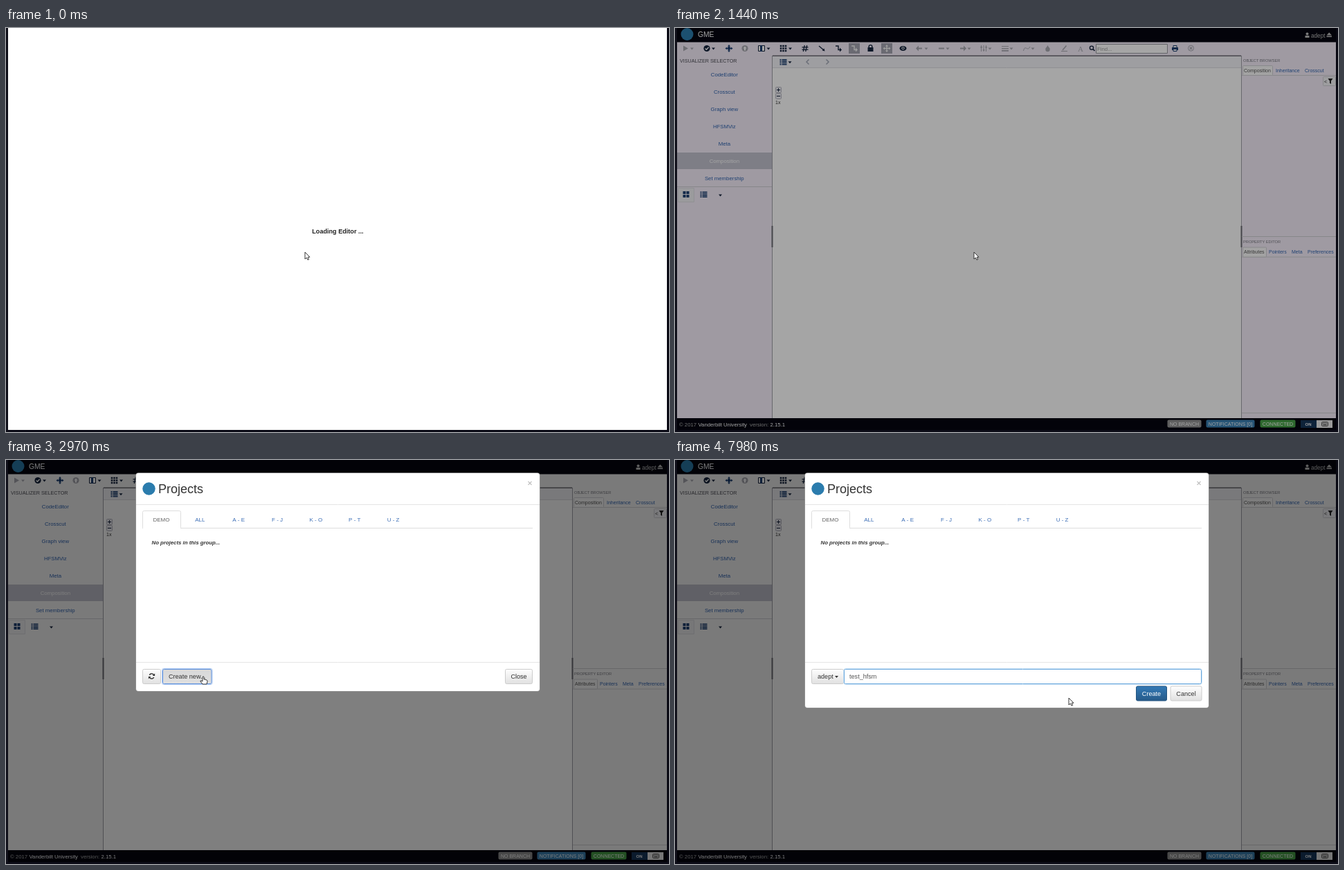
An HTML page with a canvas that plays this animation: 958x584 px, repeating every 8 s.

```html
<!DOCTYPE html>
<html lang="en">
<head>
<meta charset="utf-8">
<title>Editor</title>
<style>
html, body { margin: 0; width: 100%; height: 100%; overflow: hidden; background: #fff; }
canvas { display: block; }
</style>
</head>
<body>
<canvas id="stage" width="958" height="584"></canvas>
<script>
const ctx = document.getElementById('stage').getContext('2d');
const LOOP = 8000;
const NAVY = '#1c3f70', LINK = '#2f62ae', GREY = '#a9a9b2', DARK = '#14233c', LOGO = '#2b7cad';
const USER = 'adept';
const KEYS = [5460, 5520, 5600, 5690, 6130, 6480, 6780, 6930, 7200];
const NAME = 'test_hfsm';
const FOCUS = 2960, FORM = 3090;

const clamp = v => Math.max(0, Math.min(1, v));
const span = (t, a, b) => clamp((t - a) / (b - a));
const smooth = p => p * p * (3 - 2 * p);

// CSS ease-out: cubic-bezier(0, 0, .58, 1)
function easeOut(x) {
  let lo = 0, hi = 1;
  for (let i = 0; i < 20; i++) {
    const s = (lo + hi) / 2;
    if (1.74 * (1 - s) * s * s + s ** 3 < x) lo = s; else hi = s;
  }
  return 3 * (1 - lo) * lo * lo + lo ** 3;
}

function rect(x, y, w, h, color) {
  ctx.fillStyle = color;
  ctx.fillRect(x, y, w, h);
}

function box(x, y, w, h, fill, stroke, r = 0) {
  ctx.beginPath();
  ctx.roundRect(x + .5, y + .5, w - 1, h - 1, r);
  if (fill) { ctx.fillStyle = fill; ctx.fill(); }
  if (stroke) { ctx.strokeStyle = stroke; ctx.lineWidth = 1; ctx.stroke(); }
}

function text(s, x, y, size, color, align = 'left', style = '') {
  ctx.font = `${style} ${size}px "Liberation Sans", Arial, sans-serif`;
  ctx.textAlign = align;
  ctx.fillStyle = color;
  ctx.fillText(s, x, y);
}

function line(color, width, ...pts) {
  ctx.beginPath();
  for (let i = 0; i < pts.length; i += 2) ctx.lineTo(pts[i], pts[i + 1]);
  ctx.strokeStyle = color;
  ctx.lineWidth = width;
  ctx.stroke();
}

function poly(color, ...pts) {
  ctx.beginPath();
  for (let i = 0; i < pts.length; i += 2) ctx.lineTo(pts[i], pts[i + 1]);
  ctx.closePath();
  ctx.fillStyle = color;
  ctx.fill();
}

function disc(x, y, r, color) {
  ctx.beginPath();
  ctx.arc(x, y, r, 0, 7);
  ctx.fillStyle = color;
  ctx.fill();
}

function ring(x, y, r, color, width = 1) {
  ctx.beginPath();
  ctx.arc(x, y, r, 0, 7);
  ctx.strokeStyle = color;
  ctx.lineWidth = width;
  ctx.stroke();
}

const caret = (x, y, c) => poly(c, x - 2.5, y - 1, x + 2.5, y - 1, x, y + 2);

function grid(x, y, n, cell, gap, color) {
  const half = (n * cell + (n - 1) * gap) / 2;
  for (let i = 0; i < n * n; i++)
    rect(x - half + (i % n) * (cell + gap), y - half + Math.floor(i / n) * (cell + gap), cell, cell, color);
}

function listIcon(x, y, c) {
  for (let i = 0; i < 4; i++) {
    rect(x - 5, y - 4 + i * 2.3, 2, 1.6, c);
    rect(x - 2, y - 4 + i * 2.3, 7, 1.6, c);
  }
}

function arrowLine(x, y, dir, c) {
  line(c, 2, x - 4, y, x + 4, y);
  if (dir) poly(c, x + 5 * dir, y, x + dir, y - 4, x + dir, y + 4);
}

function elbow(x, y, c) {
  line(c, 1.4, x - 4, y - 3.5, x, y - 3.5, x, y + 2, x + 3, y + 2);
  poly(c, x + 5, y + 2, x + 2, y - 1, x + 2, y + 5);
}

function cross(x, y, c) {
  line(c, 1.3, x - 4, y, x + 4, y);
  line(c, 1.3, x, y - 4, x, y + 4);
  for (const [a, b] of [[1, 0], [-1, 0], [0, 1], [0, -1]])
    poly(c, x + 5.5 * a, y + 5.5 * b, x + 3 * a + 2 * b, y + 3 * b + 2 * a, x + 3 * a - 2 * b, y + 3 * b - 2 * a);
}

function toolbar() {
  const y = 29.5;
  poly(GREY, 12, y - 4, 12, y + 4, 19, y);
  caret(24.5, y, GREY);
  disc(46, y, 4.6, DARK);
  line('#fff', 1.3, 43.6, y, 45.4, y + 1.8, 48.6, y - 1.8);
  caret(55.5, y, DARK);
  cross(78, y, NAVY);
  disc(78, y, 2.4, NAVY);
  disc(101, y, 4.6, GREY);
  poly('#fff', 101, y - 3, 98.5, y, 100, y, 100, y + 3, 102, y + 3, 102, y, 103.5, y);
  box(120, 25, 10, 9, '#fff', DARK);
  rect(123, 25, 3, 9, NAVY);
  caret(135, y, DARK);
  grid(156.5, y, 3, 2.5, 1, DARK);
  caret(166.5, y, DARK);
  for (const d of [-1.7, 1.7]) {
    line(DARK, 1.3, 183.5, y + d, 192.5, y + d);
    line(DARK, 1.3, 187 + d, y + 4.5, 189 + d, y - 4.5);
  }
  line(DARK, 1.3, 208, 26, 215, 32);
  poly(DARK, 216.5, 33.5, 212.5, 32.5, 215.5, 29.5);
  elbow(236, y, DARK);
  rect(251, 22, 16, 15, '#a4a4b0');
  elbow(259, y, '#f4f4f4');
  ring(282.5, 27, 2.4, DARK, 1.4);
  rect(278.5, 28, 8, 6, DARK);
  rect(298, 22, 16, 15, '#a4a4b0');
  cross(306, y, '#f4f4f4');
  ctx.beginPath();
  ctx.ellipse(329.5, y, 5, 3.4, 0, 0, 7);
  ctx.fillStyle = DARK;
  ctx.fill();
  ring(329.5, y - .3, 1.7, '#fff');
  [[353, -1], [385, 0], [416, 1]].forEach(([x, d]) => arrowLine(x, y, d, GREY));
  for (let i = 0; i < 3; i++) {
    line(GREY, 1, 442.5 + i * 3.5, 25, 442.5 + i * 3.5, 34);
    rect(441.3 + i * 3.5, 27 + (i % 2) * 4, 2.6, 1.6, GREY);
    rect(472, 26 + i * 3, 10, 1 + i * .4, GREY);
  }
  ctx.beginPath();
  ctx.moveTo(503.5, 33);
  ctx.bezierCurveTo(506, 23, 509, 35, 513, 27);
  ctx.strokeStyle = GREY;
  ctx.stroke();
  [363, 394, 425, 455, 486, 517].forEach(x => caret(x, y, GREY));
  disc(538.5, 31, 3.2, GREY);
  poly(GREY, 538.5, 25, 535.6, 30, 541.4, 30);
  line(GREY, 1.6, 560, 32, 565.5, 25.5);
  line(GREY, 1, 558, 33.5, 567, 33.5);
  ctx.font = '11px "Liberation Serif", serif';
  ctx.textAlign = 'center';
  ctx.fillStyle = GREY;
  ctx.fillText('A', 586, 33.5);
  ring(602, 28.7, 2.6, DARK, 1.4);
  line(DARK, 1.6, 604, 30.6, 606.5, 33);
  box(608, 23, 104, 14, '#fff', '#9a9aa2');
  text('Find...', 610, 32.5, 7.8, '#999');
  rect(718, 28, 9, 4, NAVY);
  box(719.5, 25, 6, 4, '#fff', NAVY);
  box(719.5, 30, 6, 4, '#fff', NAVY);
  ring(745.5, 29.2, 4, GREY);
  line(GREY, 1.2, 743.8, 27.5, 747.2, 31);
  line(GREY, 1.2, 747.2, 27.5, 743.8, 31);
}

function leftPanel() {
  text('VISUALIZER SELECTOR', 7, 49.5, 7.2, '#4c4c55');
  rect(3, 180, 137, 24, '#c2c2ce');
  const items = ['CodeEditor', 'Crosscut', 'Graph view', 'HFSMViz', 'Meta', 'Composition', 'Set membership'];
  items.forEach((s, i) => text(s, 71.3, 70.3 + i * 25, 7.8, i === 5 ? '#fff' : LINK, 'center'));
  line('#d0d0d4', 1, 3, 229.5, 140, 229.5);
  box(4, 231, 24, 21, '#efeff2', '#dedee2');
  grid(16, 240.5, 2, 4, 1, NAVY);
  listIcon(41.5, 240.5, NAVY);
  caret(65.5, 241.5, DARK);
}

function tabRow(y, labels, xs, activeWidth) {
  line('#d2d2d6', 1, 819, y + 7.5, 955, y + 7.5);
  box(820, y - 7, activeWidth, 15, '#fafafa', '#d2d2d6', 1);
  labels.forEach((s, i) => text(s, xs[i], y + 2.5, 7, i ? LINK : '#555'));
}

function rightPanel() {
  text('OBJECT BROWSER', 821, 49, 5.7, '#77777f');
  tabRow(61, ['Composition', 'Inheritance', 'Crosscut'], [822, 868, 910], 44);
  box(936, 70, 19, 14, '#f2f2f5', '#d2d2d6', 1);
  text('<', 938, 79.5, 7, '#333');
  poly('#222', 943.5, 73, 950.5, 73, 948, 76.5, 948, 81, 946, 79.5, 946, 76.5);
  line('#d0d0d4', 1, 819, 301.5, 955, 301.5);
  text('PROPERTY EDITOR', 821, 311, 5.7, '#77777f');
  tabRow(323.5, ['Attributes', 'Pointers', 'Meta', 'Preferences'], [822, 858, 891, 914], 35);
  line('#d0d0d4', 1, 819, 556.5, 955, 556.5);
}

function centerFrame() {
  line('#a0a0a8', 1, 140.5, 40, 140.5, 564);
  line('#a0a0a8', 1, 818.5, 40, 818.5, 564);
  rect(141, 39.5, 677, 1.7, '#6e6e76');
  rect(139.5, 286, 2, 31, '#6b6b72');
  rect(817.5, 286, 2, 31, '#6b6b72');
}

function centerPanel() {
  rect(141, 41, 677, 16.5, '#f4f4f8');
  line('#dcdce2', 1, 141, 57.5, 818, 57.5);
  listIcon(156.5, 49, NAVY);
  caret(166, 49.2, DARK);
  line('#a4aab8', 1.5, 193.5, 45.5, 190, 49, 193.5, 52.5);
  line('#a4aab8', 1.5, 218.5, 45.5, 222, 49, 218.5, 52.5);
  box(145, 85, 9, 9, '#ececf2', '#b8b8c2', 1);
  box(145, 94, 9, 9, '#ececf2', '#b8b8c2', 1);
  line(DARK, 1, 147, 89.5, 152, 89.5);
  line(DARK, 1, 149.5, 87, 149.5, 92);
  line(DARK, 1, 147, 98.5, 152, 98.5);
  text('1x', 145, 110, 7, '#333');
}

function header() {
  rect(3, 0, 952, 20.5, '#04050f');
  disc(17.5, 9, 9, LOGO);
  text('GME', 33, 13, 10.3, '#fff');
  disc(913.5, 8.5, 2, '#bbb');
  rect(910.5, 11, 6, 3, '#bbb');
  text(USER, 919, 13.5, 8.2, '#bbb');
  poly('#bbb', 941.5, 10.5, 949, 10.5, 945.2, 6.5);
  rect(941.5, 11.5, 7.5, 1.6, '#bbb');
}

function footer() {
  rect(3, 564, 952, 17, '#04050f');
  text('© 2017', 6, 575.7, 7.75, '#aaa');
  text('Vanderbilt University', 33.5, 575.7, 7.75, '#fff');
  text('version:', 108, 575.7, 7.75, '#aaa');
  text('2.15.1', 137.5, 575.7, 7.75, '#fff');
  const badges = [['NO BRANCH', 711, 50, '#929292'], ['NOTIFICATIONS [0]', 767, 71, '#3a82b4'], ['CONNECTED', 845, 52, '#47a247']];
  for (const [s, x, w, color] of badges) {
    box(x, 566, w, 12, color, null, 2);
    text(s, x + w / 2, 574.5, 7, '#fff', 'center');
  }
  rect(904, 567, 23, 11, '#16365a');
  text('ON', 915, 575, 6, '#fff', 'center', 'bold');
  rect(927, 567, 23, 11, '#eee');
  box(934, 569, 10, 7, '#ccc', '#555', 1);
  for (let i = 0; i < 3; i++) rect(936 + i * 2.3, 571, 1, 1, '#444');
  rect(936.5, 573, 5, 1, '#444');
}

function button(x, y, w, label, mode = '') {
  const fill = ctx.createLinearGradient(0, y, 0, y + 22);
  const [top, bottom] = { primary: ['#337ab7', '#265a88'], disabled: ['#b9cade', '#b9cade'],
    hover: ['#e4e4e4', '#e0e0e0'], active: ['#d8d8d8', '#e0e0e0'] }[mode] || ['#ffffff', '#e0e0e0'];
  fill.addColorStop(0, top);
  fill.addColorStop(1, bottom);
  const edge = { primary: '#245580', disabled: '#b5c6dc', active: '#5b8fdc' }[mode] || '#cccccc';
  if (mode === 'active') box(x - 1, y - 1, w + 2, 24, null, '#b4cdf2', 2);
  box(x, y, w, 22, fill, edge, 2);
  const color = mode === 'primary' || mode === 'disabled' ? '#fff' : '#333';
  if (label) text(label, x + w / 2, y + 14, 9.1, color, 'center');
}

function refreshIcon(x, y) {
  for (const a of [0, Math.PI]) {
    ctx.beginPath();
    ctx.arc(x, y, 3.6, a + .5, a + 2.9);
    ctx.strokeStyle = '#333';
    ctx.lineWidth = 1.5;
    ctx.stroke();
    const s = a ? 1 : -1;
    poly('#333', x + 4.6 * s, y - 4 * s, x + 4.6 * s, y - .5 * s, x + 1.2 * s, y - .5 * s);
  }
}

function nameForm(t) {
  button(197, 302, 47, '');
  text(USER, 206, 316, 9.1, '#333');
  caret(233.5, 313, '#333');
  box(243, 301, 519, 24, null, '#cfe4f6', 3);
  box(244, 302, 517, 22, '#fff', '#66a6dc', 2);
  const typed = KEYS.filter(k => t >= k).length;
  const value = NAME.slice(0, typed);
  text(value || 'Project name...', 252, 316, 9.1, value ? '#555' : '#999');
  const since = t - (typed ? KEYS[typed - 1] : FOCUS);
  if (Math.floor(since / 530) % 2 === 0)
    rect(252 + (value ? ctx.measureText(value).width : 0), 308, 1, 11, '#333');
  button(666, 326.5, 45, 'Create', typed ? 'primary' : 'disabled');
  button(715.5, 326.5, 46, 'Cancel');
}

function modal(t) {
  const form = t >= FORM;
  ctx.save();
  ctx.globalAlpha = span(t, 1480, 1630);
  ctx.translate(0, -79 * (1 - easeOut(span(t, 1480, 1780))));
  box(187, 18, 585, form ? 341 : 317, '#fff', 'rgba(0,0,0,.25)', 4);
  disc(206.5, 41.5, 9.2, LOGO);
  text('Projects', 220, 47.5, 18, '#333');
  line('#c2c2c2', 1.2, 754.5, 31, 759.5, 36);
  line('#c2c2c2', 1.2, 759.5, 31, 754.5, 36);
  line('#e5e5e5', 1, 188, 64.5, 771, 64.5);
  line('#dddddd', 1, 197, 98.5, 761, 98.5);
  box(197, 73, 56, 27, '#fff', '#ddd', 2);
  rect(198, 98, 54, 3, '#fff');
  ['DEMO', 'ALL', 'A - E', 'F - J', 'K - O', 'P - T', 'U - Z'].forEach((s, i) =>
    text(s, 224.5 + i * 55.85, 89.3, 8, i ? '#3a6cb5' : '#666', 'center'));
  text('No projects in this group...', 210.5, 122.3, 7.8, '#333', 'left', 'italic bold');
  line('#e5e5e5', 1, 188, 292.5, 771, 292.5);
  if (form) nameForm(t);
  else {
    button(197, 302, 27, '');
    refreshIcon(210.5, 312.5);
    button(226, 302, 71.5, 'Create new...', t >= FOCUS ? 'active' : t >= 2520 ? 'hover' : '');
    button(721, 302, 40, 'Close');
  }
  ctx.restore();
}

function pointer(t) {
  const stops = [[2100, 432, 324], [2620, 285, 313], [4650, 285, 313], [4950, 537.5, 342.5], [5250, 569, 344]];
  let [, x, y] = stops[0];
  for (let i = 1; i < stops.length; i++) {
    const p = smooth(span(t, stops[i - 1][0], stops[i][0]));
    x += (stops[i][1] - stops[i - 1][1]) * p;
    y += (stops[i][2] - stops[i - 1][2]) * p;
  }
  ctx.save();
  ctx.translate(x, y);
  if (t >= FORM && y < 324) {
    line('#333', 1, -2, -5, 0, -4.5, 2, -5);
    line('#333', 1, 0, -4.5, 0, 4.5);
    line('#333', 1, -2, 5, 0, 4.5, 2, 5);
  } else {
    const hand = t < FORM && x < 297 && y > 302;
    const shape = new Path2D(hand
      ? 'M-1 0.5Q0 -1 1 .5V4L5 5Q6 5.4 6 7L5 11H-1L-4 7Q-4.4 5.6 -3 6L-1 7Z'
      : 'M0 0V10L2.3 8L4 11.2L5.6 10.5L4.2 7.2H7Z');
    ctx.fillStyle = '#fff';
    ctx.fill(shape);
    ctx.strokeStyle = '#222';
    ctx.lineWidth = .9;
    ctx.lineJoin = 'round';
    ctx.stroke(shape);
  }
  ctx.restore();
}

function page(t) {
  rect(0, 0, 958, 584, '#fff');
  if (t < 330) text('Loading Editor ...', 442.3, 297.2, 9.1, '#222', 'left', 'bold');
  if (t >= 570) {
    const panel = t < 1470 ? '#f5eefa' : '#f6f6f6';
    rect(3, 20, 952, 20, panel);
    rect(3, 40, 137, 524, panel);
    rect(819, 40, 136, 524, panel);
    header();
    footer();
  }
  if (t >= 330) centerFrame();
  if (t >= 690) { toolbar(); leftPanel(); rightPanel(); }
  if (t >= 840) centerPanel();
}

function draw(t) {
  page(t);
  rect(3, 0, 952, 581, `rgba(0,0,0,${.5 * span(t, 1335, 1485)})`);
  if (t > 1480) modal(t);
  pointer(t);
  rect(0, 0, 3, 584, '#10101a');
  rect(955, 0, 3, 584, '#080812');
  rect(0, 581, 958, 3, '#0b0b16');
}

const start = performance.now();
function tick() {
  draw((performance.now() - start) % LOOP);
  requestAnimationFrame(tick);
}
tick();
</script>
</body>
</html>
```
